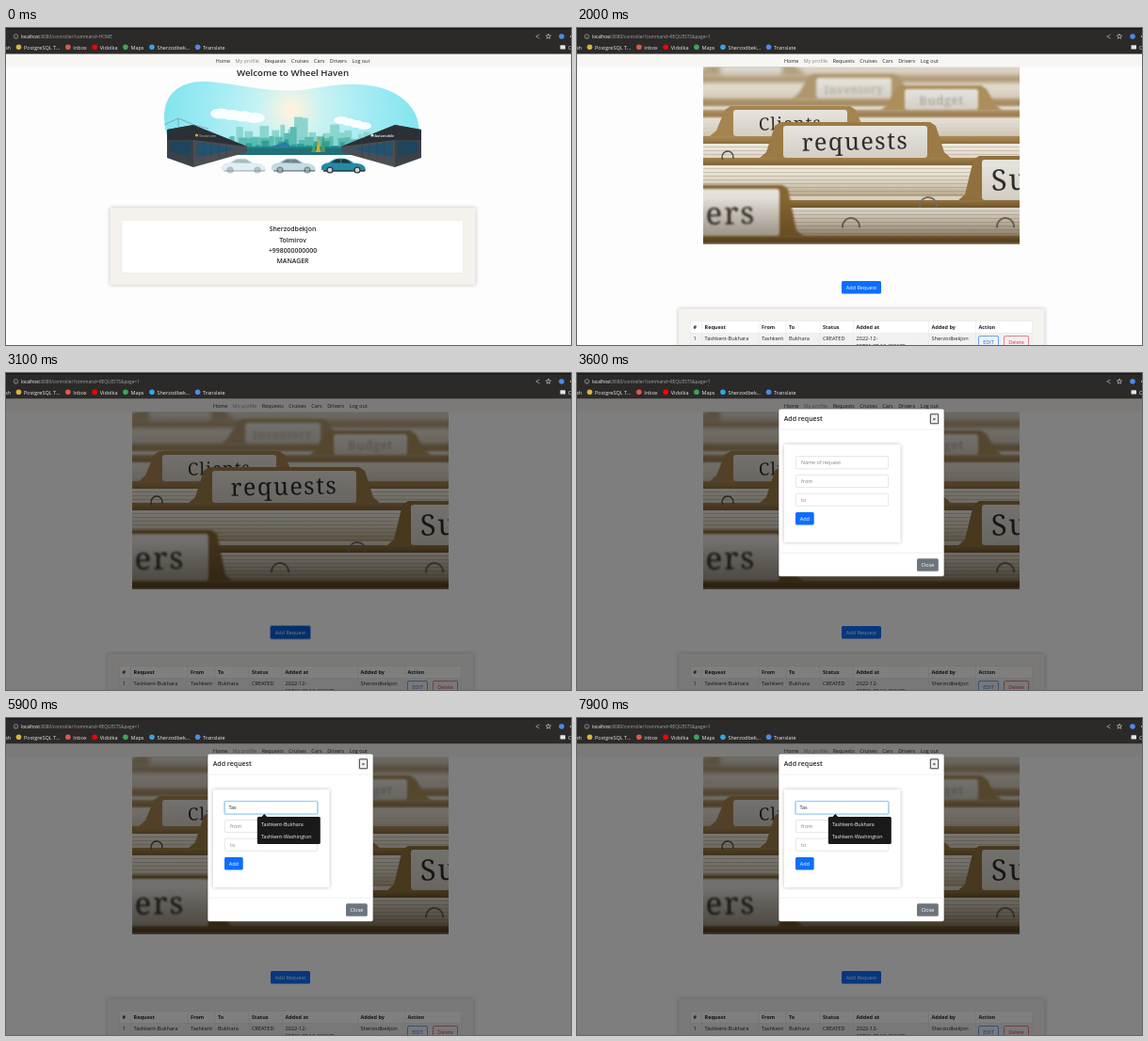
An HTML page with a canvas that plays this animation: 600 by 337 pixels, repeating every 8 s.

```html
<!DOCTYPE html>
<html lang="en">
<head>
<meta charset="utf-8">
<title>Depot requests</title>
<style>
html, body { margin: 0; width: 100%; height: 100%; overflow: hidden; background: #fdfdfd; }
canvas { display: block; width: 600px; height: 337px; }
</style>
</head>
<body>
<canvas id="stage"></canvas>
<script>
const W = 600, H = 337, LOOP = 8000, TOP = 27.6;
const SANS = '"Open Sans", "Noto Sans", sans-serif';
const SLAB = '"Noto Serif", serif';
const DARK = '#212529', BLUE = '#0d6efd', RULE = '#dee2e6';
const ratio = window.devicePixelRatio || 1;

function layer(canvas) {
  canvas.width = Math.round(W * ratio);
  canvas.height = Math.round(H * ratio);
  const ctx = canvas.getContext('2d');
  ctx.scale(ratio, ratio);
  return ctx;
}
const screen = layer(document.getElementById('stage'));
let c = screen;

// ---- helpers
function text(str, x, y, size = 5.5, color = DARK, weight = 400, align = 'left', family = SANS) {
  c.font = `${weight} ${size}px ${family}`;
  c.fillStyle = color;
  c.textAlign = align;
  c.fillText(str, x, y);
}
function width(str, size) {
  c.font = `${size}px ${SANS}`;
  return c.measureText(str).width;
}
function rect(x, y, w, h, color) {
  c.fillStyle = color;
  c.fillRect(x, y, w, h);
}
function box(x, y, w, h, r, fill, stroke, line = 0.5) {
  c.beginPath();
  c.roundRect(x, y, w, h, r);
  if (fill) { c.fillStyle = fill; c.fill(); }
  if (stroke) { c.strokeStyle = stroke; c.lineWidth = line; c.stroke(); }
}
function button(str, x, y, w, fill, stroke, color = '#fff') {
  box(x, y, w, 13.5, 1.5, fill, stroke, 0.6);
  text(str, x + w / 2, y + 8.8, 5.5, color, 400, 'center');
}
function card(x, y, w, h, fill) {
  c.save();
  c.shadowColor = 'rgba(0,0,0,.25)';
  c.shadowBlur = 4 * ratio;
  box(x, y, w, h, 1, fill);
  c.restore();
}
function path(...p) {
  c.beginPath();
  for (let i = 0; i < p.length; i += 2) c.lineTo(p[i], p[i + 1]);
}
function poly(color, ...p) {
  path(...p);
  c.fillStyle = color;
  c.fill();
}
function line(color, w, ...p) {
  path(...p);
  c.strokeStyle = color;
  c.lineWidth = w;
  c.stroke();
}
function dot(x, y, r, color, ry = r) {
  c.beginPath();
  c.ellipse(x, y, r, ry, 0, 0, 7);
  c.fillStyle = color;
  c.fill();
}
function arc(x, y, r, color, from = 0, to = 7, w = 0.6) {
  c.beginPath();
  c.arc(x, y, r, from, to);
  c.strokeStyle = color;
  c.lineWidth = w;
  c.stroke();
}
function shade(y0, y1, ...colors) {
  const g = c.createLinearGradient(0, y0, 0, y1);
  colors.forEach((color, i) => g.addColorStop(i / (colors.length - 1), color));
  return g;
}
function random(seed) {
  return () => (seed = seed * 16807 % 2147483647) / 2147483647;
}
const ramp = (t, from, to) => Math.min(1, Math.max(0, (t - from) / (to - from)));
const easeOut = k => 1 - (1 - k) ** 3;

// ---- browser frame
function browser(address) {
  rect(0, 0, W, TOP, '#2b2a29');
  rect(0, 0, W, 1.5, '#1b1b1b');
  arc(10.5, 9, 2.3, '#bbb');
  text('i', 10.5, 10.6, 4, '#bbb', 400, 'center');
  text('localhost', 16, 11, 4.77, '#fff');
  text(address, 16 + width('localhost', 4.77), 11, 4.77, '#a5a5a5');
  line('#ccc', 0.6, 566.5, 7, 562.8, 9, 566.5, 11);
  path();
  for (let i = 0; i < 10; i++) {
    const r = i % 2 ? 1.2 : 2.8, a = (i * 0.2 - 0.5) * Math.PI;
    c.lineTo(576 + r * Math.cos(a), 9 + r * Math.sin(a));
  }
  c.closePath();
  c.strokeStyle = '#ddd';
  c.stroke();
  dot(590, 9, 2.8, '#4a8af0');
  dot(600, 9, 1, '#ccc');

  text('ah', 5, 22.6, 5.35, '#ececec', 400, 'right');
  const marks = { 'PostgreSQL T…': '#d9b23c', Inbox: '#e4574a', Vidolka: '#f00', Maps: '#3aa757',
    'Sherzodbek…': '#35a3e8', Translate: '#4a8af0' };
  let x = 19;
  for (const name in marks) {
    dot(x - 5.5, 20.3, 2.8, marks[name]);
    text(name, x, 22.6, 5.5, '#ececec');
    x += width(name, 5.5) + 14;
  }
  box(588.5, 18.2, 5.5, 4.4, 0.6, '#e4e4e4');
  text('Other', 597, 22.6, 5.35, '#ececec');
}

function nav(center) {
  rect(0, TOP, W, 41.5 - TOP, '#f7f6f3');
  const names = ['Home', 'My profile', 'Requests', 'Cruises', 'Cars', 'Drivers', 'Log out'];
  const gap = 5.6, size = 5.4;
  const total = names.reduce((sum, s) => sum + width(s, size) + gap, -gap);
  let x = center - total / 2;
  for (const s of names) {
    text(s, x, 36.7, size, s === 'My profile' ? '#85888a' : DARK);
    x += width(s, size) + gap;
  }
}

// ---- home page
function hall(mirrored) {
  c.save();
  if (mirrored) { c.translate(612, 0); c.scale(-1, 1); }
  poly('#3a4148', 171, 108, 199, 103, 199, 148, 171, 138);
  poly('#4a4f55', 199, 103, 256, 126, 256, 132, 199, 148);
  poly('#2b3036', 171, 108, 199, 103, 256, 126, 199, 119, 171, 119);
  poly('#1d4560', 175, 121, 196, 121, 196, 136, 175, 132);
  poly('#235372', 203, 121, 240, 127, 240, 130, 203, 137);
  for (let x = 186; x < 240; x += 8) line('#3a4148', 0.7, x, 120, x, 137);
  c.restore();
}
function car(x, alpha, body) {
  c.save();
  c.translate(x, 138);
  c.globalAlpha = alpha;
  c.fillStyle = body;
  c.beginPath();
  c.moveTo(0, 13);
  c.bezierCurveTo(-1, 7, 3, 6, 8, 5);
  c.bezierCurveTo(15, -1, 27, -1, 34, 5.5);
  c.bezierCurveTo(43, 6, 47, 8, 47, 14);
  c.fill();
  poly('#20343f', 10, 5.3, 16, 1.5, 26, 1.5, 32, 5.8);
  rect(20.3, 1, 1, 5, body);
  rect(2, 13, 44, 1.7, '#25424f');
  for (const wheel of [9, 38]) {
    dot(wheel, 13, 3.6, '#30383e');
    dot(wheel, 13, 2.3, '#cfd5d8');
  }
  c.restore();
}
function skyline() {
  const rnd = random(71);
  ['#8cd5cf', '#58bcb2', '#349f98'].forEach((color, depth) => {
    for (let x = 213; x < 392; x += 5 + rnd() * 5) {
      const edge = 1 - Math.abs(x - 303) / 170;
      const h = (14 + rnd() * 24) * edge * (1 - depth * 0.32);
      rect(x, 130 - h, 4 + rnd() * 7, h + 4, color);
    }
  });
}
function scene() {
  c.save();
  c.beginPath();
  c.moveTo(168, 95);
  c.bezierCurveTo(168, 66, 190, 55, 216, 57);
  c.bezierCurveTo(250, 60, 280, 69, 314, 66);
  c.bezierCurveTo(345, 62, 365, 56, 396, 63);
  c.bezierCurveTo(428, 71, 442, 95, 438, 115);
  c.lineTo(430, 135);
  c.lineTo(180, 135);
  c.bezierCurveTo(174, 122, 168, 112, 168, 95);
  c.clip();
  const sky = c.createRadialGradient(303, 87, 2, 303, 87, 130);
  ['#fff3df', '#c9f2f3', '#aeeef4', '#98e9f2', '#85e5ef'].forEach((s, i) => sky.addColorStop(i / 4, s));
  rect(160, 50, 290, 90, sky);
  dot(303, 87, 4.5, '#fff0dc');
  for (let i = 0; i < 4; i++) {
    dot(228 + i * 12, 91 + i * 1.5, 11, '#f8feff', 5.5);
    dot(356 + i * 8, 98 + i * 2, 8, '#f8feff', 4);
  }
  line('#5b8d98', 0.6, 168, 103, 183, 96, 200, 103, 215, 107);
  line('#5b8d98', 0.6, 183, 96, 183, 107);
  skyline();
  rect(200, 126, 210, 10, '#1b858a');
  poly('#216f79', 238, 128, 372, 128, 388, 135, 224, 135);
  ['#3da55d', '#d0ad3e', '#4d9a59'].forEach((color, i) =>
    poly(color, 324 + i * 5, 132, 327 + i * 5, 122 - i * 5, 329 + i * 5, 132));
  poly('#2a7fa0', 279, 127, 297, 121, 304, 127);
  c.restore();
  hall(false);
  hall(true);
  dot(202.5, 114, 1.6, '#e2a13b');
  dot(389, 114, 1.6, '#e8e8e8');
  text('Showroom', 205, 116, 3.6, '#c9b896');
  text('Automobile', 391.5, 116, 3.7, '#fff', 600);
  ['#8fc9d3', '#8fbcc8', '#258ba3'].forEach((color, i) => car(229 + i * 53, 0.28 + 0.18 * i * (i + 1) / 1.5, color));
}
function home() {
  rect(0, TOP, W, H, '#fdfdfd');
  nav(304.5);
  text('Welcome to Wheel Haven', 304.5, 51, 9.7, DARK, 600, 'center');
  scene();
  card(110.5, 191, 388, 82, '#f5f2ee');
  box(123, 204.5, 362.5, 56, 0, '#fff', '#e8e5e1');
  ['Sherzodbekjon', 'Tolmirov', '+998000000000', 'MANAGER'].forEach((s, i) =>
    text(s, 304.5, 216.3 + i * 11.2, 6.9, DARK, 600, 'center'));
}

// ---- photo of card folders, painted once from back to front
function folder(x, y, w, h, str, size, i) {
  const base = y + h, blur = Math.abs(i - 4) * 0.6;
  const ink = i < 3 ? '#a19b92' : '#2f2c29';
  const brown = light => `hsl(37 ${26 + i * 3}% ${light - i * 4}%)`;
  c.filter = blur ? `blur(${blur * ratio}px)` : 'none';
  rect(120, base + 7, 364, 34, shade(base + 7, base + 41, '#f0ece3', '#dcd5c6', '#b7a789'));
  for (let s = base + 11; s < base + 40; s += 4) rect(120, s, 364, 0.8, 'rgba(130,110,75,.35)');
  poly(brown(60), x - 26, base + 1, x - 18, base - 6, x - 9, y, x - 3, y - 4,
    x + w + 3, y - 4, x + w + 9, y, x + w + 18, base - 6, x + w + 26, base + 1);
  rect(120, base, 364, 8, shade(base, base + 8, brown(62), brown(52)));
  box(x, y, w, h, 3, shade(y, base, '#e6e4de', '#d4cec4'));
  c.save();
  c.translate(x + w / 2, y + h * 0.75);
  c.rotate(-0.02);
  c.letterSpacing = size / 18 + 'px';
  text(str, 0, 0, size, ink, 500, 'center', SLAB);
  c.restore();
}
function paintPhoto() {
  const canvas = document.createElement('canvas');
  c = layer(canvas);
  c.beginPath();
  c.rect(134, 41.5, 336, 188.5);
  c.clip();
  rect(134, 41, 336, 190, '#d9d2c5');
  [
    [152, 34, 66, 16, '', 8],
    [254, 53, 80, 22, 'Inventory', 12],
    [348, 65, 78, 22, 'Budget', 13],
    [166, 87, 121, 28, 'Clients', 18.5],
    [219, 104, 153, 34, 'requests', 25.3],
    [430, 140, 60, 43, 'Su', 31],
    [112, 171, 103, 50, 'ers', 33]
  ].forEach((f, i) => folder(...f, i));
  c.filter = `blur(${0.6 * ratio}px)`;
  arc(160, 137, 6, '#4a4640', 2.6, 6.6, 1.3);
  for (let i = 0; i < 3; i++) arc(291 + i * 82, 211 - (i % 2) * 22, 9, '#77716a', 3, 6.4, 2);
  c.filter = 'none';
  rect(134, 180, 336, 51, shade(180, 231, 'rgba(40,26,6,0)', 'rgba(40,26,6,.4)'));
  c = screen;
  return canvas;
}
const photo = paintPhoto();

// ---- requests page
function requests(t) {
  rect(0, TOP, W, H, '#fdfdfd');
  nav(301.8);
  c.drawImage(photo, 0, 0, W, H);

  const hot = t >= 2500 && t < 3300;
  if (hot && t >= 2800) box(280, 268, 44, 15.6, 2.4, 'rgba(49,132,253,.5)');
  button('Add Request', 281, 269, 42, hot ? '#0b5ed7' : BLUE);

  card(108, 298.5, 388.5, 60, '#f5f3ef');
  rect(120.5, 311.5, 363, 30, '#fff');
  rect(120.5, 324.5, 363, 20, '#f1f1f1');
  const cells = [
    ['#', '1', 12], ['Request', 'Tashkent-Bukhara', 60.5], ['From', 'Tashkent', 29], ['To', 'Bukhara', 36],
    ['Status', 'CREATED', 35.5], ['Added at', '2022-12-', 80], ['Added by', 'Sherzodbekjon', 50], ['Action', '', 60]
  ];
  let x = 120.5;
  line(RULE, 0.5, x, H, x, 311.5, 483.5, 311.5);
  line(RULE, 0.5, x, 324.5, 483.5, 324.5);
  for (const [head, value, w] of cells) {
    text(head, x + 3, 320.2, 5.5, DARK, 700);
    text(value, x + 3, 332.3, 5.6);
    x += w;
    line(RULE, 0.5, x, 311.5, x, H);
  }
  text('05T21:37:13.483675', 296.5, 340, 5.6);
  button('EDIT', 426.5, 327.5, 21, null, BLUE, BLUE);
  button('Delete', 453.5, 327.5, 26, null, '#dc3545', '#dc3545');
}

// ---- dialog
function field(y, hint, value = '', focus = 0) {
  if (focus) box(231, y - 1, 101, 15.4, 2, `rgba(125,190,245,${0.45 * focus})`);
  box(232.3, y, 98.4, 13.2, 1.5, '#fff', focus ? '#68b4dd' : '#ced4da', 0.6);
  if (value) text(value, 236.5, y + 8.7, 5.4);
  else text(hint, 238, y + 8.7, 5.4, '#7c838a');
}
function menu(items) {
  const wide = Math.max(...items.map(s => width(s, 5.35)));
  poly('#191919', 271, 105.5, 274.3, 102, 277.6, 105.5);
  box(266.8, 105, wide + 13.5, 3.6 + items.length * 12.7, 1.5, '#191919');
  items.forEach((s, i) => text(s, 271, 115 + i * 12.7, 5.35, '#f4f4f4'));
}
function suggestions(typed) {
  const past = ['pen', 'A', 'Basic Code', 'java', 'test', 'Talvik 13'];
  const trips = ['Tashkent-Bukhara', 'Tashkent-Washington'];
  return typed.length > 1 ? trips : typed ? ['test', 'Talvik 13', ...trips] : past;
}
function dialog(t) {
  const k = easeOut(ramp(t, 3150, 3500));
  if (!k) return;
  c.save();
  c.globalAlpha = k;
  c.translate(0, -17.6 * (1 - k));
  box(214.2, 38.2, 175.6, 178, 1.8, '#fff', 'rgba(0,0,0,.3)');
  text('Add request', 219.7, 51.2, 7, DARK, 600);
  for (const y of [60, 191.3]) line(RULE, 0.5, 214.2, y, 389.8, y);
  box(375.3, 43.8, 8.4, 10, 0.3, '#f0f0f0', '#222', 0.9);
  text('×', 379.5, 50.9, 5.8, '#111', 600, 'center');
  card(220, 76, 123.5, 104, '#fff');
  const typed = 'Tas'.slice(0, [5400, 5600, 5900].filter(key => t >= key).length);
  field(88.7, 'Name of request', typed, ramp(t, 4250, 4450));
  field(108.4, 'from');
  field(128.1, 'to');
  button('Add', 232, 148, 19.7, BLUE);
  button('Close', 361, 197.3, 22.8, '#6c757d');
  if (t >= 4400) menu(suggestions(typed));
  c.restore();
}

function status() {
  box(-2, 332.8, 108, 8, 1, '#2b2a29');
  text('0/controller?command=REQUESTS&page=1', 0, 338.2, 5, '#d8d8d8');
}

function draw(now) {
  const t = now % LOOP;
  const list = t >= 1600;
  c.clearRect(0, 0, W, H);
  if (list) requests(t); else home();
  rect(0, TOP, W, H, `rgba(0,0,0,${0.5 * ramp(t, 2920, 3080)})`);
  dialog(t);
  if (t >= 1200 && t < 2000) status();
  browser(':8080/controller?command=' + (list ? 'REQUESTS&page=1' : 'HOME'));
}

const start = performance.now();
function tick() {
  draw(performance.now() - start);
  requestAnimationFrame(tick);
}
tick();
</script>
</body>
</html>
```
